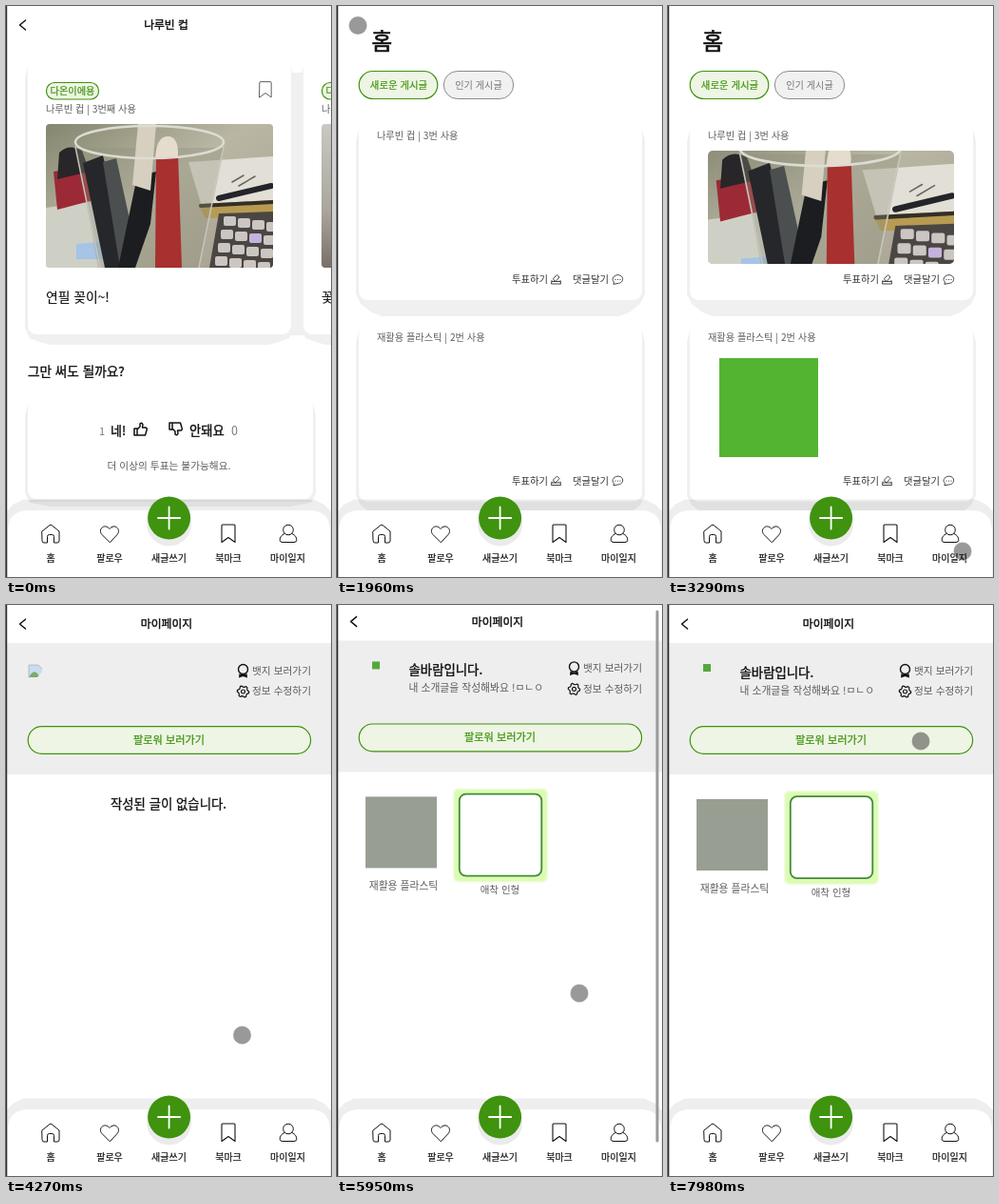
Recreate the animation shown at these times as an HTML page. Size 342x600 px, loop 8 s.

```html
<!DOCTYPE html>
<html lang="ko">
<head>
<meta charset="utf-8">
<title>App walkthrough</title>
<style>
html, body { margin: 0; width: 100%; height: 100%; overflow: hidden; background: #fff; }
svg { display: block; width: 342px; height: 600px; }
text { font-family: 'Noto Sans CJK KR', 'Noto Sans CJK', 'Noto Sans', sans-serif; }
</style>
</head>
<body>
<svg id="stage" viewBox="0 0 342 600" xmlns="http://www.w3.org/2000/svg"></svg>
<script>
const LOOP = 8000, STEP = 70;
const GREEN = '#3f930f', SOFT = '#eef5e4', GREY = '#5c5c5c', INK = '#111', SHADE = '#f0f0f0';
const CUP = '나루빈 컵';

// "bold" is the width of a thin outline that thickens the letters
const text = (x, y, size, str, fill = INK, anchor = 'start', bold = 0) =>
  `<text x="${x}" y="${y}" font-size="${size}" fill="${fill}" text-anchor="${anchor}" stroke="${fill}" stroke-width="${bold}">${str}</text>`;
const rect = (x, y, w, h, fill, r = 0, extra = '') =>
  `<rect x="${x}" y="${y}" width="${w}" height="${h}" rx="${r}" fill="${fill}" ${extra}/>`;
const fillPath = (d, fill) => `<path d="${d}" fill="${fill}"/>`;
const line = (d, color = INK, w = 1.2) =>
  `<path d="${d}" fill="none" stroke="${color}" stroke-width="${w}" stroke-linecap="round" stroke-linejoin="round"/>`;
const group = (id, body) => `<g id="${id}">${body}</g>`;
const at = (x, y, body, scale = 1) => `<g transform="translate(${x} ${y}) scale(${scale})">${body}</g>`;

const backArrow = line('M20.5 15L14.5 20L20.5 25', INK, 1.5);
const bookmark = (color = INK) => line('M-7 -8.5Q-7 -9.5 -6 -9.5H6Q7 -9.5 7 -8.5V9L0 4L-7 9Z', color, 1.1);

// White card with a stepped pale shadow beneath it
function card(x, y, w, h, drop = 17) {
  const b = y + h, r = x + w;
  const shadow = `M${x} ${y + 6}L${x - 3} ${y + 18}V${b - 6}L${x + 2} ${b + 4}L${x + 13} ${b + drop * .75}` +
    `L${x + 24} ${b + drop}H${r - 24}L${r - 13} ${b + drop * .75}L${r - 2} ${b + 4}L${r + 3} ${b - 6}V${y + 18}L${r} ${y + 6}Z`;
  return fillPath(shadow, SHADE) + rect(x, y, w, h, '#fff', 9);
}

function photo() {
  let keys = '';
  for (let r = 0; r < 4; r++)
    for (let c = 0; c < 4; c++)
      keys += rect(187 + c * 15 - r * 3, 97 + r * 14 + c * 2, 13, 10, r === 1 && c === 2 ? '#c5b2dc' : '#cbc6c2', 2);
  return rect(0, 0, 239, 151, 'url(#wall)') +
    fillPath('M0 88L60 80L75 151H0Z', '#cfd0c5') +
    fillPath('M8 50L44 44L50 80L12 90Z', '#9c2a36') +
    fillPath('M14 30Q24 20 38 28L46 50L12 58Z', '#282629') +
    fillPath('M32 126L56 124L60 142L32 142Z', '#a5c4e6') +
    fillPath('M150 40L239 34V84L165 90Z', '#e2e0d6') +
    line('M196 61L208 54M203 65L220 55', '#68665f', 1.5) +
    line('M182 78L237 65', '#24242a', 6) +
    fillPath('M160 84L239 80V97L168 99Z', '#b89b52') +
    line('M163 86L239 82', '#332f28', 4) +
    fillPath('M182 94L239 92V151H172Z', '#4a4643') + keys +
    fillPath('M32 25L186 25L160 151H55Z', 'rgba(140,140,122,.35)') +
    fillPath('M39 41L60 33L88 151H62Z', '#25272a') +
    fillPath('M60 40L74 36L88 100L78 151Z', '#4b4f50') +
    fillPath('M96 55L116 50L110 105L94 151H76Z', '#1c1d20') +
    fillPath('M97 0H116L110 70L91 64Z', '#d7d0c1') +
    fillPath('M116 34L139 30L143 151H115Z', '#a8302f') +
    fillPath('M115 37Q116 13 128 13T139 34Z', '#e5dccd') +
    `<ellipse cx="109" cy="19" rx="78" ry="17" fill="none" stroke="#dcdcd2" stroke-width="2.500"/>` +
    line('M31 24L57 151M187 24L161 151', '#c4c5bb', 1.5);
}

function nav() {
  const items = [[47, '홈'], [109, '팔로우'], [171.5, '새글쓰기'], [234, '북마크'], [296.5, '마이일지']];
  return fillPath('M1 531L7 524L18 518.5H324L335 524L342 531V600H1Z', 'rgba(0,0,0,.065)') +
    fillPath('M2 600V552Q2 530 24 530H319Q341 530 341 552V600Z', '#fff') +
    `<circle cx="171.600" cy="544" r="23.500" fill="#ebebeb"/><circle cx="171.600" cy="538" r="22.500" fill="${GREEN}"/>` +
    line('M160 538H183.200M171.600 526.500V549.500', '#fff', 1.8) +
    at(47, 554.5, line('M-9 -2.500L-1 -9Q0 -9.700 1 -9L9 -2.500V7.500Q9 9.500 7 9.500H3.500V3Q3.500 1 1.500 1H-1.500Q-3.500 1 -3.500 3V9.500H-7Q-9 9.500 -9 7.500Z', INK, 1)) +
    at(109, 555, line('M0 8.500L-8 .5C-13 -5 -5 -12 0 -5.500C5 -12 13 -5 8 .5Z', INK, 1)) +
    at(234, 554.5, bookmark()) +
    at(297, 554.5, '<circle cy="-4" r="5.300" fill="none" stroke="#111"/>' +
      line('M-4 0Q-9 2 -8.800 7Q-8.500 9 -6 9H6Q8.500 9 8.800 7Q9 2 4 0', INK, 1)) +
    items.map(([x, s]) => text(x, 583.5, 10, s, INK, 'middle', .2)).join('');
}

const badge = x => rect(x + .5, 80.5, 55, 17.5, SOFT, 8.5, `stroke="${GREEN}" stroke-width="1.200"`) +
  text(x + 28, 92.8, 10.2, '다온이에용', GREEN, 'middle', .2);

const thumb = line('M-6 -1H-3V6H-6ZM-3 0L0 -3V-6Q2 -8 3 -5L2.500 -2H6Q8 -1 7 1L5.500 6H-3', INK, 1.5);

function detailPage() {
  return rect(0, 0, 342, 600, '#fff') + backArrow + text(168.5, 24.2, 11.8, CUP, INK, 'middle', .4) +
    rect(300, 70, 13, 276, SHADE) +
    card(23, 58, 277, 287, 11) + card(313, 58, 277, 287, 11) +
    badge(42) + badge(332) +
    text(42, 112, 10.2, CUP + ' | 3번째 사용', GREY) + text(332, 112, 10.2, CUP, GREY) +
    at(273, 88, bookmark('#555'), .88) +
    `<g clip-path="url(#shot1)">${at(42, 124, photo())}</g>` +
    rect(332, 124, 30, 151, 'url(#side)', 4) +
    text(42, 311, 13.8, '연필 꽂이~!', INK, 'start', .15) + text(332, 311, 13.8, '꽃', INK, 'start', .15) +
    text(23, 389, 13.6, '그만 써도 될까요?', INK, 'start', .35) +
    card(23, 412, 300, 106, 8) + line('M26 520H320', '#e6e6e6', 2) +
    text(98, 451, 11, '1', '#777') + text(110, 451, 13, '네!', INK, 'start', .4) +
    at(141, 445, thumb) + at(178, 444, `<g transform="scale(1 -1)">${thumb}</g>`) +
    text(193, 451, 13.3, '안돼요', INK, 'start', .4) + text(237, 451, 12.5, '0', '#777') +
    text(171.5, 487, 10.7, '더 이상의 투표는 불가능해요.', GREY, 'middle');
}

function post(y, label) {
  return card(23, y, 298, 185) + text(42, y + 16, 10.2, label, GREY) +
    text(184, y + 167, 10.3, '투표하기', '#333') + text(248, y + 167, 10.3, '댓글달기', '#333') +
    at(230.5, y + 163.5, line('M-4.500 1L-5 4.500H5L4.500 1M-2 1L-3 -1L1 -5L3.500 -2.500L0 1.500ZM-4.500 2H4.500', '#333', .9)) +
    at(295.5, y + 163.5, line('M-4.500 4.500L-4 2.500C-8 -1 -3 -5.500 1 -4.800C7 -4 6.500 4 0 4Z', '#333', .9) +
      line('M-2.500 0H-2.400M0 0H.1M2.500 0H2.600', '#333', 1.2));
}

function homePage() {
  return rect(0, 0, 342, 600, '#fff') + text(36.5, 46, 23.5, '홈', INK, 'start', .7) +
    rect(23.2, 68.5, 82.6, 29, SOFT, 14.5, `stroke="${GREEN}" stroke-width="1.200"`) +
    text(65, 86.8, 10.4, '새로운 게시글', GREEN, 'middle', .2) +
    rect(112.3, 68.5, 73.4, 29, '#f1f1f1', 14.5, 'stroke="#8a8a8a"') + text(149, 86.8, 10.2, '인기 게시글', '#777', 'middle') +
    post(124, CUP + ' | 3번 사용') + post(335.5, '재활용 플라스틱 | 2번 사용') +
    group('pics', `<g clip-path="url(#shot2)">${at(42, 129, photo(), 1.084)}</g>` +
      rect(54, 370, 104, 104, '#53b431'));
}

function gear() {
  let d = '';
  for (let i = 0; i < 24; i++) {
    const a = i / 24 * Math.PI * 2, r = i % 4 < 2 ? 6.2 : 4.8;
    d += (i ? 'L' : 'M') + (Math.cos(a) * r).toFixed(2) + ' ' + (Math.sin(a) * r).toFixed(2);
  }
  return line(d + 'Z', INK, 1.2) + '<circle r="2" fill="none" stroke="#111" stroke-width="1.200"/>';
}

function myPage() {
  return rect(0, 0, 342, 600, '#fff') + group('scroller',
    backArrow + text(169, 24.2, 11.8, '마이페이지', INK, 'middle', .4) +
    rect(1, 40, 341, 138, '#eee') +
    at(249.5, 69, '<circle cy="-1.500" r="5" fill="none" stroke="#111" stroke-width="1.400"/>' +
      fillPath('M-4 3L-4.500 7.500L0 6L4.500 7.500L4 3Q0 5 -4 3Z', INK)) +
    at(249.5, 91, gear()) +
    text(321, 72.8, 10.7, '뱃지 보러가기', GREY, 'end') + text(321, 94.3, 10.7, '정보 수정하기', GREY, 'end') +
    rect(23.2, 127.6, 297.4, 28.8, SOFT, 14.4, `stroke="${GREEN}" stroke-width="1.200"`) +
    text(171.5, 146, 11.2, '팔로워 보러가기', GREEN, 'middle', .25) +
    group('empty', text(171, 213.5, 13.4, '작성된 글이 없습니다.', INK, 'middle', .3) +
      fillPath('M24 63H34L38 67V76H24Z', '#c9dcf2') + fillPath('M24 76Q29 67 33 72L36 76Z', '#7eaa6a') +
      fillPath('M33 76L38 70V76Z', '#eee') + line('M24 76V63H34L38 67', '#a9b2bb', .8)) +
    group('filled', text(75.5, 75.5, 13.4, '솔바람입니다.', INK, 'start', .4) +
      text(75.5, 93.5, 10.8, '내 소개글을 작성해봐요 !ㅁㄴㅇ', GREY) +
      rect(30, 204, 75, 75, '#989f92') + text(70, 302, 10.8, '재활용 플라스틱', GREY, 'middle') +
      rect(122, 195, 100, 99, 'rgba(220,251,180,.5)', 5) + rect(123.5, 196.5, 97, 96, '#dcfbb4', 5) +
      rect(128.8, 201.2, 86.5, 86, '#fff', 7, 'stroke="#438b37" stroke-width="1.800"') +
      text(171.5, 305.5, 10.5, '애착 인형', GREY, 'middle')) +
    group('avatar', rect(37, 62, 8, 8, '#55a83c')));
}

document.getElementById('stage').innerHTML =
  `<defs>
    <linearGradient id="wall" x2="1" y2="1"><stop stop-color="#85866f"/><stop offset=".45" stop-color="#b9b7a4"/><stop offset="1" stop-color="#a59e8e"/></linearGradient>
    <linearGradient id="side" x2="0" y2="1"><stop stop-color="#c9c8c2"/><stop offset=".6" stop-color="#aaa69d"/><stop offset="1" stop-color="#77706a"/></linearGradient>
    <clipPath id="shot1">${rect(42, 124, 239, 151, '#000', 4)}</clipPath>
    <clipPath id="shot2">${rect(42, 152, 259, 119, '#000', 5)}</clipPath>
  </defs>` +
  group('detail', detailPage()) + group('home', homePage()) + group('mine', myPage()) + nav() +
  group('bar', rect(335.5, 3, 3, 559, '#999', 1.5)) + rect(0, 0, 1.2, 600, '#333') +
  `<circle id="dot" r="9.700" fill="#000" fill-opacity=".4" stroke="#fff" stroke-opacity=".45"/>`;

const el = {};
document.querySelectorAll('g[id], #dot').forEach(n => el[n.id] = n);
const show = (name, on) => el[name].setAttribute('display', on ? 'inline' : 'none');

// Pointer route: time, x, y
const route = [
  [140, 156, 612], [210, 149, 596], [560, 72, 280], [840, 18, 74], [980, 12, 40],
  [1260, 23, 24], [1540, 23, 24], [1820, 22, 20.5], [1960, 22, 20.5],
  [2240, 150, 235], [2450, 318, 525], [2520, 354, 540], [2590, 354, 586],
  [2660, 323, 581], [2800, 311, 573], [3010, 311, 573], [3080, 319, 585], [3150, 319, 585],
  [3290, 310, 573], [3710, 237, 441], [3850, 248.5, 452], [4550, 248.5, 452],
  [4900, 253, 430], [5040, 253, 430], [5390, 255, 408], [6300, 255, 408],
  [6650, 97, 269], [6790, 97, 269], [7140, 208, 390], [7980, 266, 143]
];

function pointer(t) {
  let i = 0;
  while (i < route.length - 2 && t >= route[i + 1][0]) i++;
  const [t0, x0, y0] = route[i], [t1, x1, y1] = route[i + 1];
  const k = Math.min(1, Math.max(0, (t - t0) / (t1 - t0)));
  return [x0 + (x1 - x0) * k, y0 + (y1 - y0) * k];
}

// Short elastic scroll that returns to rest
const nudge = (t, start, length) =>
  t > start && t < start + length ? 3 * Math.sin(Math.PI * (t - start) / length) : 0;

function draw(t) {
  show('detail', t < 1960);
  show('home', t >= 1960 && t < 4270);
  show('pics', t >= 2100);
  show('mine', t >= 4270);
  show('empty', t < 4340);
  show('filled', t >= 4410);
  show('avatar', t >= 5880);
  const shift = nudge(t, 4970, 420) + nudge(t, 5810, 420);
  el.scroller.setAttribute('transform', `translate(0 ${-shift})`);
  el.bar.setAttribute('transform', `translate(0 ${shift})`);
  el.bar.setAttribute('opacity', t < 4620 ? 0 : Math.min(1, Math.max(0, (6580 - t) / 210)));
  const [x, y] = pointer(t);
  el.dot.setAttribute('transform', `translate(${x} ${y})`);
  el.dot.setAttribute('fill-opacity', t >= 6650 && t < 6800 ? .45 : .4);
}

function tick() {
  const t = performance.now() % LOOP;
  draw(Math.floor(t / STEP) * STEP);
  requestAnimationFrame(tick);
}
tick();
</script>
</body>
</html>
```
